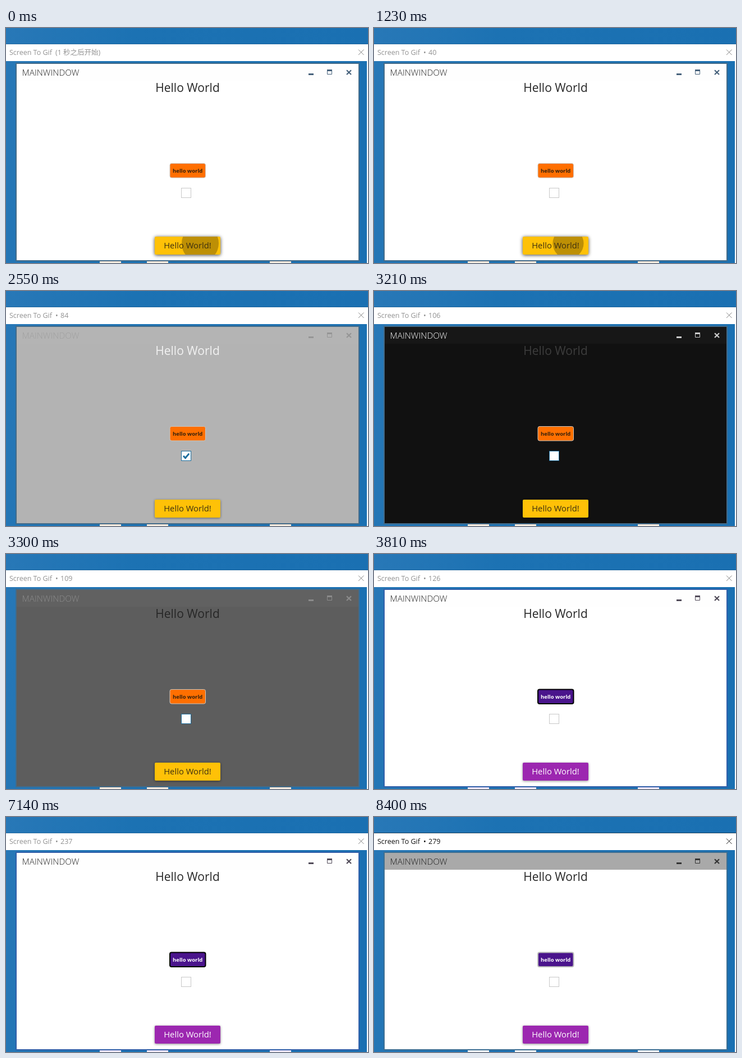
These frames come from a looping animation (645x419 px, 8430 ms). An HTML page:

```html
<!DOCTYPE html>
<html lang="zh-CN">
<meta charset="utf-8">
<title>Theme switch</title>
<style>
  html, body { margin: 0; width: 100%; height: 100%; overflow: hidden; }
  svg { display: block; width: 645px; height: 419px; }
  text { font-family: "Open Sans", "Noto Sans", "Noto Sans CJK SC", "Noto Sans CJK", sans-serif; white-space: pre; }
  .mid { text-anchor: middle; }
</style>
<svg viewBox="0 0 645 419">
  <defs>
    <linearGradient id="sky" x2="1" y2=".12">
      <stop offset="0" stop-color="#2878b7"/>
      <stop offset=".35" stop-color="#1c72b3"/>
      <stop offset="1" stop-color="#1a70b2"/>
    </linearGradient>
    <clipPath id="clip"><rect x="265" y="372" width="117" height="32" rx="2"/></clipPath>
  </defs>
  <rect width="645" height="419" fill="url(#sky)"/>

  <!-- recorder frame -->
  <path d="M0 29H645V419H643V59H0Z" fill="#fff"/>
  <path id="edge" d="M0 28.5H645" stroke="#1c405c"/>
  <text id="caption" y="48" font-size="12.5"><tspan x="6">Screen To Gif</tspan><tspan id="mark" x="88"></tspan><tspan id="count" x="97"></tspan></text>
  <path id="quit" d="M628 38.5l9.5 9.5m0-9.5l-9.5 9.5" fill="none"/>
  <path d="M167 414h38v5h-38zM251 414h38v5h-38zM470 414h38v5h-38z" fill="#f8f8fb"/>
  <path id="tint" d="M167 416.5h38m46 0h38m181 0h38" stroke-width="4"/>

  <!-- application window -->
  <rect id="glow" x="18" y="63" width="611" height="352" fill="none" stroke-width="2"/>
  <rect id="body" x="19" y="64" width="609" height="350"/>
  <rect id="bar" x="19" y="64" width="609" height="30"/>
  <rect id="hover" x="526" y="64" width="34" height="30" fill="#ffae00"/>
  <text id="title" class="mid" x="79.5" y="85" font-size="15.3" font-weight="300">MAINWINDOW</text>
  <g id="icons" fill="none">
    <path d="M539 82.5h9" stroke-width="3"/>
    <path d="M572.5 75v7.5h8V75" stroke-width="1"/>
    <path d="M572 75.5h9" stroke-width="3"/>
    <path d="M607 75.2l8 7.8m0-7.8l-8 7.8" stroke-width="2.2"/>
  </g>
  <text id="hello" class="mid" x="323.5" y="114" font-size="21">Hello World</text>

  <rect id="swap" x="292" y="241.5" width="63.5" height="25.5" rx="3"/>
  <text id="swapText" class="mid" x="323.7" y="258" font-size="9.5" font-weight="700">hello world</text>

  <rect id="box" x="312.5" y="285.5" width="17" height="17" fill="#fff"/>
  <path id="tick" d="M316 294l3.6 3.7 6.6-7.8" fill="none" stroke="#1d6f9f" stroke-width="3"/>

  <rect id="raised" x="265" y="372" width="117" height="32" rx="2"/>
  <g clip-path="url(#clip)"><circle id="ripple" cx="346" cy="384"/></g>
  <text id="raisedText" class="mid" x="323.5" y="393" font-size="14.8">Hello World!</text>
</svg>
<script>
const LOOP = 8430, STEP = 30;
const $ = id => document.getElementById(id);
const set = (id, attrs) => { for (const k in attrs) $(id).setAttribute(k, attrs[k]); };
const within = (t, a, b) => t >= a && t < b;
const ramp = (t, a, b) => Math.min(1, Math.max(0, (t - a) / (b - a)));
const grey = (from, to, p) => { const v = Math.round(from + (to - from) * p); return `rgb(${v},${v},${v})`; };

const themes = {
  amber: { raised: '#ffc107', text: '#3d3010', swap: '#ff6f00', swapText: '#33200c', glow: '#426b8a', tint: '#fde8d7' },
  purple: { raised: '#9c27b0', text: '#fff', swap: '#4a148c', swapText: '#fff', glow: '#315fa9', tint: '#eee5f7' }
};

function drawRipple(t) {
  const age = t < 900 ? t + 180 : t - 1080;
  const grow = ramp(age, 0, 460);
  set('ripple', { r: 84 * grow, opacity: age < 0 ? 0 : .26 * (1 - ramp(age, 300, 620)) });
}

function draw(t) {
  const frame = Math.floor(t / STEP);
  const theme = within(t, 3600, 4740) || t >= 6510 ? themes.purple : themes.amber;
  const recording = t >= 8190;
  const focused = within(t, 3540, 8190);

  $('mark').textContent = frame ? '•' : '(1 秒之后开始)';
  $('count').textContent = frame ? frame - 1 : '';
  set('caption', { fill: recording ? '#111' : '#929292' });
  set('quit', { stroke: recording ? '#222' : '#858585' });
  set('edge', { opacity: recording ? 1 : .25 });

  // The heading turns first; the window surface follows.
  const textDark = ramp(t, 2355, 2451) * .84 + ramp(t, 2451, 2610) * .16 - ramp(t, 3120, 3222);
  const surface = ramp(t, 2490, 2680) - ramp(t, 3240, 3430);
  const chrome = ramp(t, 2490, 2570) * .75 + ramp(t, 2570, 2680) * .25 - ramp(t, 3240, 3360);
  set('body', { fill: grey(255, 17, surface) });
  set('bar', { fill: recording ? '#a9a9a9' : grey(254, 23, surface) });
  set('hello', { fill: grey(38, 255, textDark) });
  set('title', { fill: grey(30, 255, chrome) });
  set('icons', {
    stroke: chrome > 0 ? grey(75, 205, chrome) : recording ? '#343434' : t < 3600 ? '#47627c' : '#514b59'
  });
  set('hover', { opacity: +(within(t, 5760, 6030) || within(t, 7170, 7530)) });
  set('glow', { stroke: recording ? '#3b6e93' : theme.glow });
  set('tint', { stroke: recording ? '#f4f6f8' : theme.tint });

  set('swap', {
    fill: theme.swap,
    stroke: focused ? '#000' : recording ? '#b9b9b9' : '#cbc5bf',
    'stroke-width': focused || recording ? 2 : 1
  });
  set('swapText', { fill: theme.swapText });
  set('box', { stroke: within(t, 2130, 3450) ? '#1d6f9f' : '#c8c8c8' });
  set('tick', { opacity: +within(t, 2340, 3120) });

  set('raised', { fill: theme.raised });
  $('raised').style.filter = t < 2460
    ? 'drop-shadow(0 1px 3px rgba(0,0,0,.75))'
    : 'drop-shadow(0 1px 2px rgba(0,0,0,.45))';
  set('raisedText', { fill: theme.text });
  drawRipple(t);
}

const start = performance.now();
function tick() {
  draw((performance.now() - start) % LOOP);
  requestAnimationFrame(tick);
}
tick();
</script>
</html>
```
